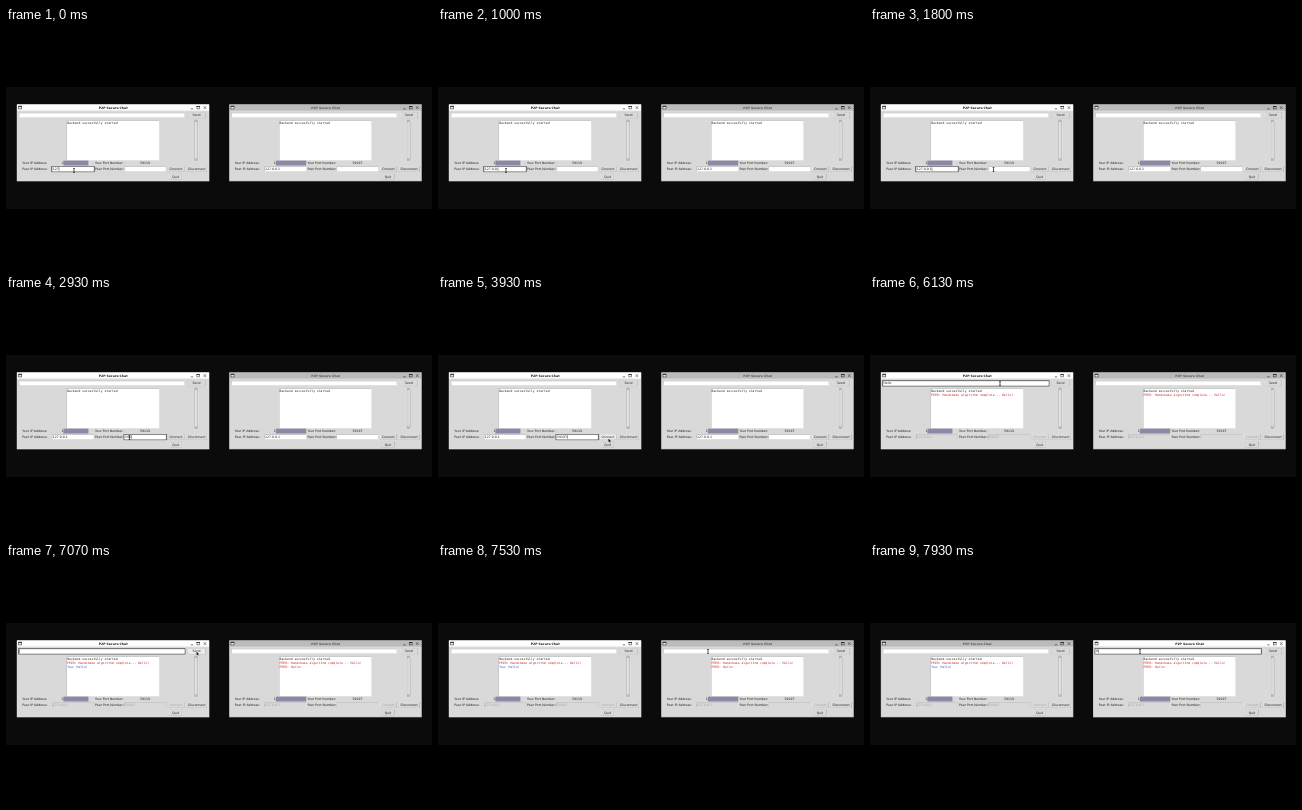
These frames come from a looping animation (426 px wide and 240 px high, 8000 ms). An HTML page with a canvas:

```html
<!DOCTYPE html>
<html lang="en">
<head>
<meta charset="utf-8">
<title>Secure chat demo</title>
<style>
html, body { margin: 0; width: 100%; height: 100%; overflow: hidden; background: #000; }
canvas { display: block; width: 426px; height: 240px; }
</style>
</head>
<body>
<canvas></canvas>
<script>
const LOOP = 8000;
const SANS = '"DejaVu Sans", sans-serif';
const MONO = '"DejaVu Sans Mono", monospace';
const canvas = document.querySelector('canvas');
const ctx = canvas.getContext('2d');
const ratio = window.devicePixelRatio || 1;
canvas.width = 426 * ratio;
canvas.height = 240 * ratio;
ctx.scale(ratio, ratio);
ctx.textRendering = 'geometricPrecision';

// Each key press is [time, character].
const ipKeys = [[0, '127'], [70, '.'], [130, '0'], [270, '.'], [670, '0'], [930, '.'], [1130, '1']];
const portKeys = [[2330, '5'], [2600, '9'], [2930, '1'], [3130, '9'], [3270, '7']];
const helloKeys = [[5470, 'H'], [5600, 'e'], [5730, 'l'], [5870, 'l'], [6070, 'o'], [6330, '!']];
const replyKeys = [[7870, 'H']];
const typed = (keys, t) => keys.filter(k => k[0] <= t).map(k => k[1]).join('');

// Each pointer move is [start, end, x, y].
const moves = [
  [0, 0, 68, 142.3], [1530, 1740, 123.5, 141.2], [3670, 3880, 170.5, 142.5],
  [4470, 4690, 130, 87.3], [6730, 6940, 190.5, 87.5], [7200, 7470, 270, 87.2]
];

function pointerAt(t) {
  let [, , x, y] = moves[0];
  for (const [start, end, nextX, nextY] of moves.slice(1)) {
    if (t < start) break;
    const p = Math.min(1, (t - start) / (end - start));
    const ease = p * p * (3 - 2 * p);
    x += (nextX - x) * ease;
    y += (nextY - y) * ease;
  }
  return { x, y };
}

function rect(x, y, w, h, color) {
  ctx.fillStyle = color;
  ctx.fillRect(x, y, w, h);
}

function text(str, x, y, { color = '#1c1c1c', align = 'left', font = '3.15px ' + SANS } = {}) {
  ctx.font = font;
  ctx.textAlign = align;
  ctx.fillStyle = color;
  ctx.fillText(str, x, y);
}

function bevel(x, y, w, h, light, dark, fill) {
  rect(x, y, w, h, dark);
  rect(x, y, w - 0.4, h - 0.4, light);
  rect(x + 0.4, y + 0.4, w - 0.8, h - 0.8, fill);
}

function button(label, x, y, w, { hover = false, disabled = false } = {}) {
  bevel(x, y, w, 5.6, '#f4f4f4', '#929292', hover ? '#ececec' : '#d9d9d9');
  text(label, x + w / 2, y + 3.9, { align: 'center', color: disabled ? '#a3a3a3' : '#1c1c1c' });
}

function entry(x, y, w, value, { focusedAt = null, disabled = false, t = 0 } = {}) {
  const focused = focusedAt !== null;
  if (focused) rect(x - 0.5, y - 0.5, w + 1, 6, '#111');
  bevel(x, y, w, 5, '#a0a0a0', '#f0f0f0', disabled ? '#d9d9d9' : '#fff');
  text(value, x + 0.7, y + 3.6, { color: disabled ? '#a3a3a3' : '#1c1c1c' });
  if (focused && !disabled && (t - focusedAt) % 900 < 600)
    rect(x + 0.8 + ctx.measureText(value).width, y + 0.7, 0.4, 3.6, '#111');
}

function titleBar(active) {
  rect(10.8, 76.3, 192.5, 77, active ? '#e8e8e8' : '#b8b8b8');
  rect(11.2, 76.6, 191.7, 6.2, active ? '#fff' : '#bbb');
  rect(11.2, 82.6, 191.7, 70.2, '#d9d9d9');
  const ink = active ? '#111' : '#555';
  text('P2P Secure Chat', 107.2, 80.8, { align: 'center', color: ink, font: 'bold 3.1px ' + SANS });
  rect(12.3, 77.8, 3.6, 3.4, '#222');
  rect(12.8, 78.9, 2.6, 1.8, '#eee');
  rect(184.8, 80.6, 2.4, 0.6, '#222');
  ctx.strokeStyle = '#222';
  ctx.lineWidth = 0.5;
  ctx.strokeRect(190.9, 78.3, 2.8, 2.6);
  rect(190.7, 78, 3.2, 0.8, '#222');
  ctx.beginPath();
  ctx.moveTo(197.6, 78.2); ctx.lineTo(200.2, 81);
  ctx.moveTo(200.2, 78.2); ctx.lineTo(197.6, 81);
  ctx.stroke();
}

function scrollbar() {
  bevel(188.6, 91.8, 3.6, 41.4, '#999', '#f0f0f0', '#c6c6c6');
  bevel(189, 94.2, 2.8, 36.6, '#f4f4f4', '#929292', '#d9d9d9');
  ctx.fillStyle = '#aaa';
  for (const [base, tip] of [[93.8, 92.3], [131.2, 132.7]]) {
    ctx.beginPath();
    ctx.moveTo(189.1, base); ctx.lineTo(191.7, base); ctx.lineTo(190.4, tip);
    ctx.fill();
  }
}

function chatWindow(offset, w) {
  const { t, linked } = w;
  ctx.save();
  ctx.translate(offset, 0);
  titleBar(w.active);
  entry(12.8, 84.8, 166, w.message, { focusedAt: w.messageFocus, t });
  button('Send', 181.7, 84.5, 17.6, { hover: w.hover === 'send' });
  bevel(60.6, 92.6, 93, 39.8, '#a8a8a8', '#f0f0f0', '#fff');
  w.lines.forEach(([line, color], i) =>
    text(line, 61.2, 95.9 + i * 3.8, { color, font: '3.1px ' + MONO }));
  scrollbar();

  text('Your IP Address:', 16.3, 136.1);
  text('1', 55.4, 136.1);
  rect(57.4, 132.6, w.maskWidth, 4.9, '#8b89a8');
  text('Your Port Number:', 89, 136.1);
  text(w.ownPort, 139, 136.1, { align: 'center' });

  text('Peer IP Address:', 16.3, 142.3);
  entry(46, 138.6, 42, w.ip, { focusedAt: w.ipFocus, disabled: linked, t });
  text('Peer Port Number:', 89, 142.3);
  entry(118.2, 138.6, 42, w.port, { focusedAt: w.portFocus, disabled: linked, t });
  button('Connect', 161.6, 138.3, 16.6, { hover: w.hover === 'connect' && !linked, disabled: linked });
  button('Disconnect', 180.4, 138.3, 20.6);
  button('Quit', 163.2, 145.6, 12.8);
  ctx.restore();
}

function drawPointer({ x, y }, isArrow) {
  if (isArrow) {
    ctx.beginPath();
    ctx.moveTo(x, y);
    for (const [dx, dy] of [[0, 3.8], [0.9, 3], [1.5, 4.3], [2.1, 4], [1.5, 2.8], [2.7, 2.7]])
      ctx.lineTo(x + dx, y + dy);
    ctx.closePath();
    ctx.strokeStyle = '#fff';
    ctx.lineWidth = 0.5;
    ctx.stroke();
    ctx.fillStyle = '#111';
    ctx.fill();
  } else {
    rect(x - 0.35, y - 2, 0.7, 4.4, '#111');
    rect(x - 1, y - 2.2, 2, 0.5, '#111');
    rect(x - 1, y + 2.1, 2, 0.5, '#111');
  }
}

function draw(t) {
  const during = (from, to) => t >= from && t < to ? from : null;
  const linked = t >= 4270;
  const sent = t >= 7070;
  const pointer = pointerAt(t);
  const onConnect = t > 3800 && t < 4550;
  const onSend = t > 6880 && t < 7260;
  const log = [['Backend succesfully started', '#1c1c1c']];
  if (t >= 4330) log.push(['PEER: Handshake algorithm complete... Hello!', '#cc1f1f']);

  rect(0, 0, 426, 240, '#000');
  rect(0, 59, 426, 122, '#0b0b0b');

  chatWindow(0, {
    t, linked,
    active: t < 7600,
    message: sent ? '' : typed(helloKeys, t),
    messageFocus: during(5270, 7500),
    ip: typed(ipKeys, t),
    ipFocus: during(0, 1870),
    port: typed(portKeys, t),
    portFocus: during(1870, 5270),
    ownPort: '59119',
    maskWidth: 25,
    hover: onConnect ? 'connect' : onSend ? 'send' : '',
    lines: sent ? [...log, ['You: Hello!', '#1f3fcc']] : log
  });
  chatWindow(212.4, {
    t, linked,
    active: t >= 7600,
    message: typed(replyKeys, t),
    messageFocus: during(7600, LOOP),
    ip: '127.0.0.1',
    ipFocus: null,
    port: '',
    portFocus: null,
    ownPort: '59197',
    maskWidth: 30.4,
    hover: '',
    lines: sent ? [...log, ['PEER: Hello!', '#cc1f1f']] : log
  });
  drawPointer(pointer, onConnect || onSend);
}

function tick() {
  draw(performance.now() % LOOP);
  requestAnimationFrame(tick);
}
tick();
</script>
</body>
</html>
```
